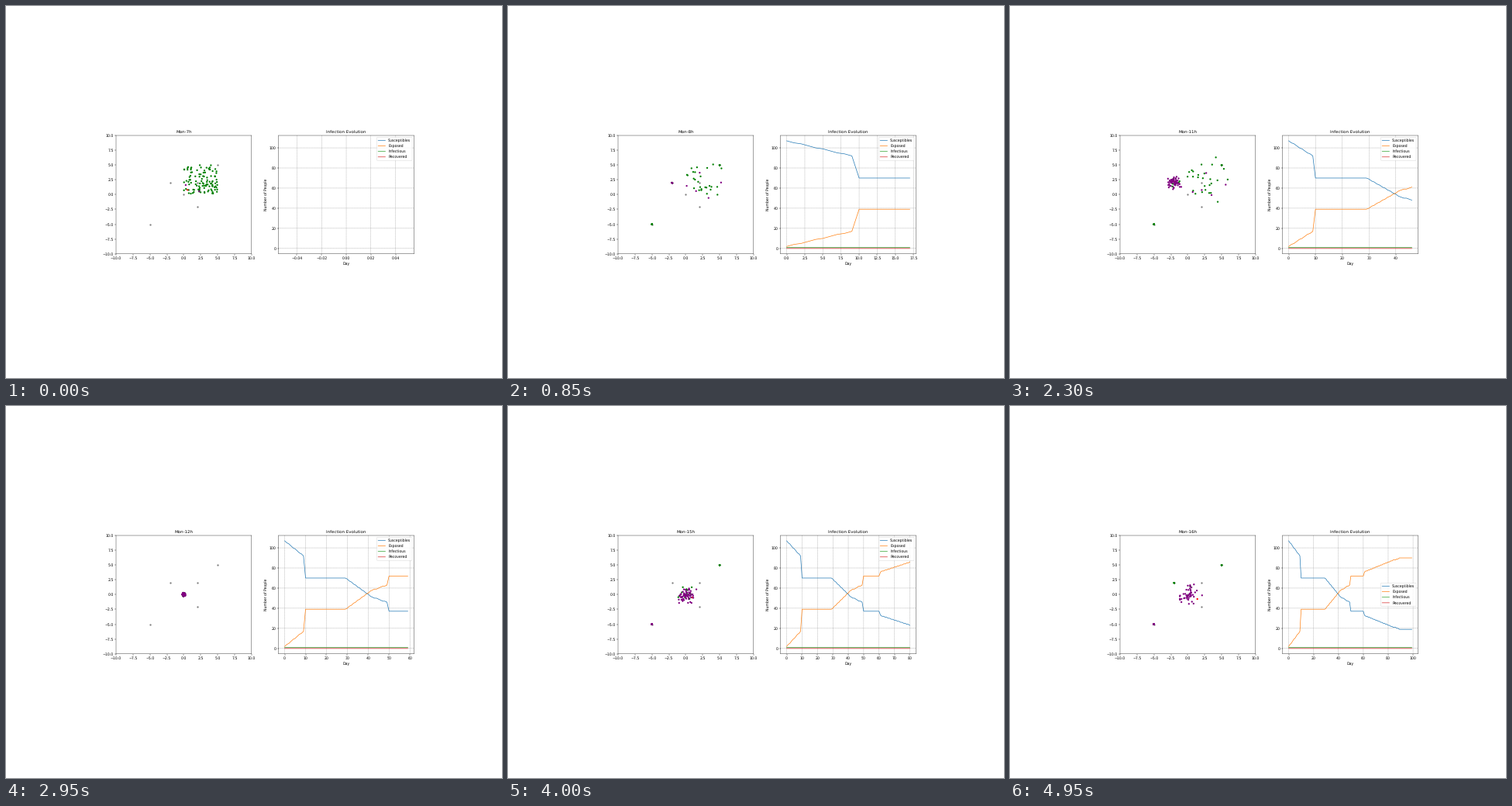
Recreate the animation shown at these times as a matplotlib script. Size 640 by 480 pixels, loop 5000 ms.

```python
import numpy as np
import matplotlib.pyplot as plt
from matplotlib.animation import FuncAnimation

FRAMES, PEOPLE, PER_HOUR = 100, 110, 10
CARRIER = PEOPLE - 1
SCALE = 496 / 1500          # the 15 x 6 inch chart is shown reduced
STEP = 0.12                 # spread of one random-walk step

SQUARE, OFFICE, SHOP, FARM = (0, 0), (-2, 2), (5, 5), (-5, -5)
PLACES = [SQUARE, OFFICE, SHOP, FARM, (2, -2), (2, 2)]

# Key points (frame, exposed people): slow spread while people walk,
# jumps whenever a crowd meets.
EXPOSED_KEYS = [(0, 2), (9, 17), (10, 39), (29, 39), (42, 58), (49, 63),
                (50, 72), (60, 72), (61, 76), (80, 86), (90, 90)]

scaled = {
    "font.size": 10, "axes.linewidth": 0.8, "axes.titlepad": 6,
    "axes.labelpad": 4, "lines.linewidth": 1.5, "grid.linewidth": 0.8,
    "patch.linewidth": 1.0}
for axis in ("xtick", "ytick"):
    scaled.update({f"{axis}.major.size": 3.5, f"{axis}.major.width": 0.8,
                   f"{axis}.major.pad": 3.5})
plt.rcParams.update({key: value * SCALE for key, value in scaled.items()})
plt.rcParams.update({"font.family": "DejaVu Sans",
                     "text.hinting": "no_hinting",
                     "path.snap": False})


def exposed_series():
    keys = np.transpose(EXPOSED_KEYS)
    return np.rint(np.interp(np.arange(FRAMES), *keys)).astype(int)


def build_paths():
    """Positions per frame; people are numbered in order of exposure."""
    rng = np.random.default_rng(4)
    walk = np.cumsum(rng.normal(0, STEP, (FRAMES, PEOPLE, 2)), axis=0)
    start = rng.uniform(0, 5, (PEOPLE, 2))
    start[CARRIER] = 0.55, 0.8
    pos = start + walk - walk[0]

    # A few early cases and many late ones stay at home in the morning.
    everyone = np.arange(PEOPLE)
    late = rng.permutation(np.arange(63, CARRIER))
    home = np.append(np.arange(1, 17, 3)[:5], late[:26])
    shop, farm = late[26:34], late[34:43]
    office = np.setdiff1d(everyone, np.concatenate([home, shop, farm]))

    def send(who, place, begin, roam=None):
        pos[begin:, who] = place
        if roam is not None:
            pos[roam:, who] = place + walk[roam:, who] - walk[roam - 1, who]

    send(office, OFFICE, 10, roam=30)
    send(shop, SHOP, 10)
    send(farm, FARM, 10)
    crowd = SQUARE + rng.normal(0, STEP, (PEOPLE, 2))
    send(everyone, crowd, 50, roam=60)
    afternoon = everyone[40:65]
    send(afternoon, FARM, 60, roam=60)
    send(afternoon, FARM, 70)
    send(everyone[100:CARRIER], SHOP, 70)
    send(everyone[91:100], OFFICE, 90)
    send(everyone[:20], FARM, 90)
    return pos


exposed = exposed_series()
paths = build_paths()
series = [
    ("Susceptibles", "tab:blue", PEOPLE - 1 - exposed),
    ("Exposed", "tab:orange", exposed),
    ("Infectious", "tab:green", np.ones(FRAMES)),
    ("Recovered", "tab:red", np.zeros(FRAMES))]

fig = plt.figure(figsize=(6.4, 4.8), dpi=100, facecolor="white")


def add_panel(left):
    width, height = 384.4 / 2.2, 152.77
    return fig.add_axes([left / 640, 1 - 319.78 / 480,
                         width / 640, height / 480])


town = add_panel(142)
town.set(xlim=(-10, 10), ylim=(-10, 10))
dot = dict(s=(5 * SCALE) ** 2, linewidths=0)
town.scatter(*np.transpose(PLACES), color="gray", **dot)
dots = town.scatter(*paths[0].T, color="green", **dot)
title = town.set_title("")

chart = add_panel(351.67)
chart.set(title="Infection Evolution", xlabel="Day",
          ylabel="Number of People", ylim=(-5.35, 112.35))
chart.grid(linestyle="--", color="0.55")
lines = [chart.plot([], [], color=color, label=name)[0]
         for name, color, _ in series]
chart.legend(loc="best")


def draw(frame):
    title.set_text(f"Mon-{7 + frame // PER_HOUR}h")

    # Healthy people lie lowest, then the carrier, then the exposed.
    count = exposed[frame]
    order = np.append(np.arange(count, PEOPLE), np.arange(count))
    dots.set_offsets(paths[frame, order])
    dots.set_facecolor(["green"] * (PEOPLE - 1 - count) + ["red"]
                       + ["purple"] * count)

    days = np.arange(frame + 1)
    for line, (_, _, values) in zip(lines, series):
        line.set_data(days, values[:frame + 1])
    margin = 0.05 * frame if frame else 0.055
    chart.set_xlim(-margin, frame + margin)
    return [dots, title, *lines]


anim = FuncAnimation(fig, draw, frames=FRAMES, interval=50,
                     init_func=lambda: [], repeat=True, repeat_delay=0)
plt.show()
```
